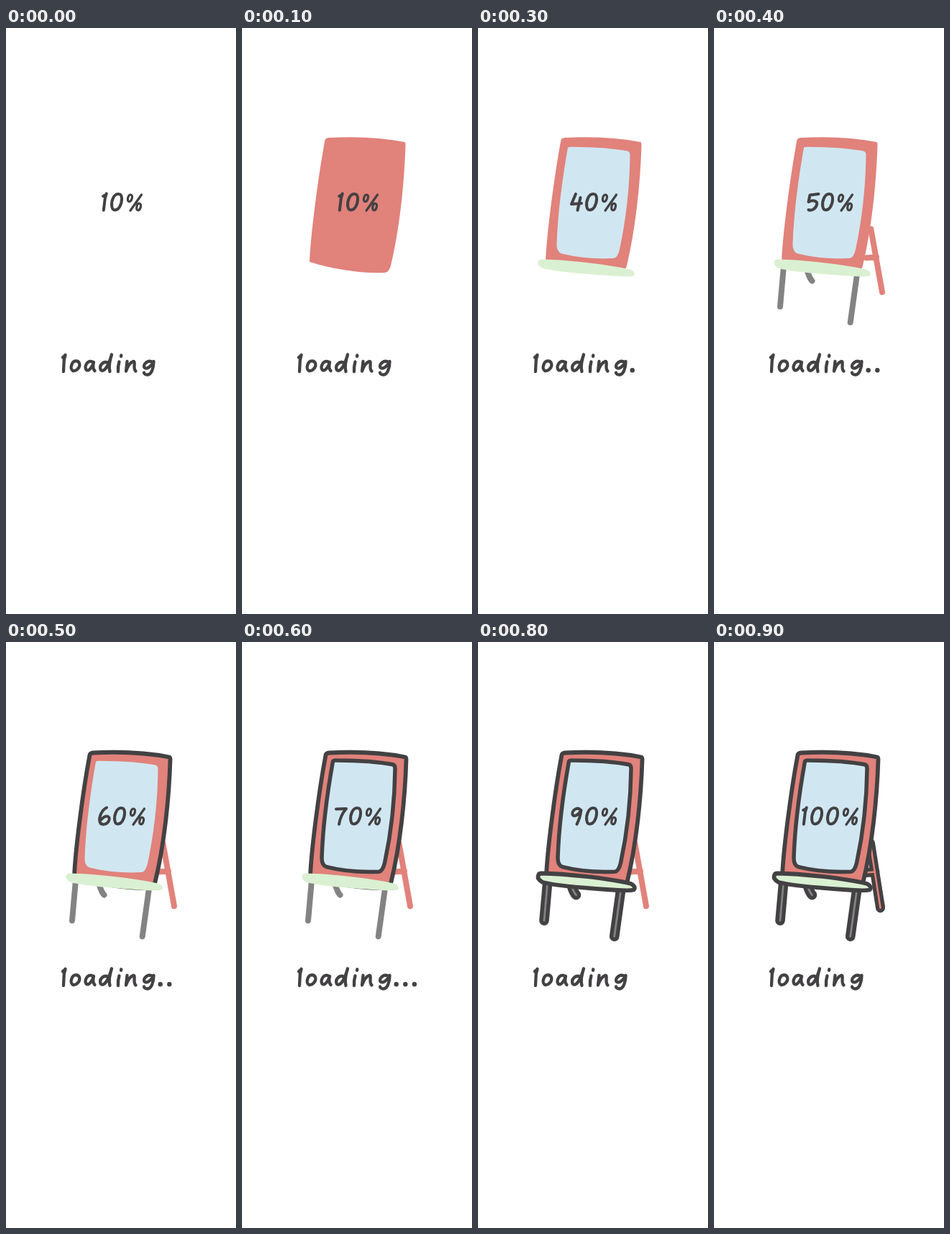
An HTML page with a canvas for the animation above (1000 ms loop, 320 by 812 pixels).

```html
<!DOCTYPE html>
<html lang="en">
<head>
<meta charset="utf-8">
<title>loading</title>
<style>
  html, body { margin: 0; width: 100%; height: 100%; overflow: hidden; background: #fff; }
  canvas { display: block; width: 320px; height: 812px; }
</style>
</head>
<body>
<canvas id="stage" width="320" height="812" role="img" aria-label="loading"></canvas>
<script>
const ctx = document.getElementById('stage').getContext('2d');
const INK = '#434143', RED = '#e1827b', BLUE = '#d0e7f1', GREEN = '#daf0d2', GRAY = '#838383';
const LOOP = 1000, STEP = 100;
const path = d => new Path2D(d);

const frame = path('M94 324C95 290 106 205 115.5 155Q116 152.5 121 152Q180 149 226 158Q227.5 158.5 227.5 161C226 215 219 280 206.5 331Q204 338 199 339C170 341 125 334 94 324Z');
const screenShape = path('M125 166Q126 164.5 130 164.7Q180 165 208 170.5Q211.5 171.5 211.5 176C211 225 205 270 197 307Q194 318.5 189 319Q150 321 116 312.5Q109.5 310 109.5 300C111 255 118 205 125 166Z');
const tray = path('M88 320.5C120 321 180 327 213 335Q220 339 217 343Q213 345.5 180 343C150 341 110 338 90 333Q83 329 83.5 325Q84 320.5 88 320.5Z');
const legs = path('M97 330L92 386M198.5 345L189.7 408M130 337Q133 347 136.5 350.5');
const prop = path('M218.3 278.5L234 366M212 318.5L226 317.5');
const propLine = path('M217.5 279L231.5 368.5M212 319.5L224 318.5');

// Hand-lettered digits, drawn from the top left of a 28px line
const digits = [
  'M12 3C5 2 1 13 2.3 20.5C3.5 27 9.5 26.5 13 21C17 14 17.5 3.5 12 3Z',
  'M8.8 2.5L6.8 9 4.8 25.5M8 4L4.2 6',
  'M4 7C8 1 17 2 15 9Q12 16 3 24.5L16 24',
  'M3 2.5L8 5 18.5 4 10 12.5C16 12 17.5 16 15.5 20C13 25 8 26.5 3.5 25',
  'M9 3L3 17 17 16M15.5 8L11.5 25.5',
  'M18.5 3L6.5 4.5 4.5 14C12 10.5 17.5 13 16 18C14 24 9 26.5 4.5 25',
  'M13 2.5C6 6 2 16 3.5 22C5 27.5 13 26.5 16 21C19 14.5 12.5 11 5 19.5',
  'M4 4.5L18 4Q10 13 8 25.5',
  'M16.5 6C14 1 6 3 6.5 8.5C7 13 15.5 14 15 20C14 26.5 4 27 4 21.5C4 15 17.5 13 16.5 6Z',
  'M16 6C11 0 3 7 4.5 12C6 16 13 13 16.5 6Q15 17 10.5 25.5'
].map(path);
const percent = path('M21.5 4L6 26M6.5 4C2.5 4 1 13 4 13.5C8 14 10.5 4.5 6.5 4ZM18.5 16C14.5 16 13.5 25 16.5 25.5C20 26 22.5 16.5 18.5 16Z');

const word = path(
  'M82.6 453L80.8 460 80 476M82 454L79 456.5' +
  'M98 461.5C91.5 460.5 88.5 472 92.5 474.5C97 477 104 470 102 464.5Q100.5 461.5 98 461.5Z' +
  'M121 463C114 459 108.5 468 111.5 473.5C115 477 120 470 122 463Q120 472 123.5 475' +
  'M142 464C135 460.5 129 468 132 474C136 477.5 142 470 147 452.5Q142 468 144.5 476' +
  'M157.5 462.5Q155.5 469 156 476M160.3 453.5L160 455' +
  'M168.5 462L167 475.5Q171 464 177 462C181 462 176 472 180.5 475.5' +
  'M204 463.5C198 458.5 190 466 192.5 470.5C196 474 203 468 205.5 462C205.5 472 202 480 197 480.5Q192.5 480.5 192 477.5');

function fill(shape, color) {
  ctx.fillStyle = color;
  ctx.fill(shape);
}

function line(shape, width, color = INK) {
  ctx.lineWidth = width;
  ctx.strokeStyle = color;
  ctx.stroke(shape);
}

function shifted(x, y, draw) {
  ctx.save();
  ctx.translate(x, y);
  draw();
  ctx.restore();
}

function outlined(shape, width, core, color) {
  line(shape, width);
  line(shape, core, color);
}

function drawEasel(step) {
  if (step >= 4) {
    line(prop, 8, RED);
    line(legs, 8, GRAY);
  }
  if (step >= 9) outlined(propLine, 13, 2.6, RED);
  if (step >= 8) outlined(legs, 13.6, 2.8, GRAY);
  if (step >= 1) fill(frame, RED);
  if (step >= 2) fill(screenShape, BLUE);
  if (step >= 5) shifted(1, 1.5, () => line(frame, 5.8));
  if (step >= 6) shifted(1.5, -0.8, () => line(screenShape, 5.5));
  if (step >= 3) fill(tray, GREEN);
  if (step >= 7) line(tray, 5.8);
}

function drawPercent(value) {
  const chars = [...String(value)];
  const advance = c => c === '1' ? 14 : 22;
  let x = 149 - chars.reduce((sum, c) => sum + advance(c), 0) / 2;
  for (const c of chars) {
    shifted(x, 227, () => line(digits[c], 4));
    x += advance(c);
  }
  shifted(x, 227, () => line(percent, 3.2));
}

function drawLoading(dots) {
  line(word, 4.3);
  ctx.fillStyle = INK;
  for (let i = 0; i < dots; i++) {
    ctx.beginPath();
    ctx.arc(214.7 + 12.6 * i, 474.3, 3.2, 0, Math.PI * 2);
    ctx.fill();
  }
}

function render() {
  const step = Math.floor(performance.now() % LOOP / STEP);
  ctx.fillStyle = '#fff';
  ctx.fillRect(0, 0, 320, 812);
  ctx.lineCap = ctx.lineJoin = 'round';
  drawEasel(step);
  drawPercent(step < 2 ? 10 : (step + 1) * 10);
  drawLoading(Math.floor(step / 2) % 4);
  requestAnimationFrame(render);
}
render();
</script>
</body>
</html>
```
